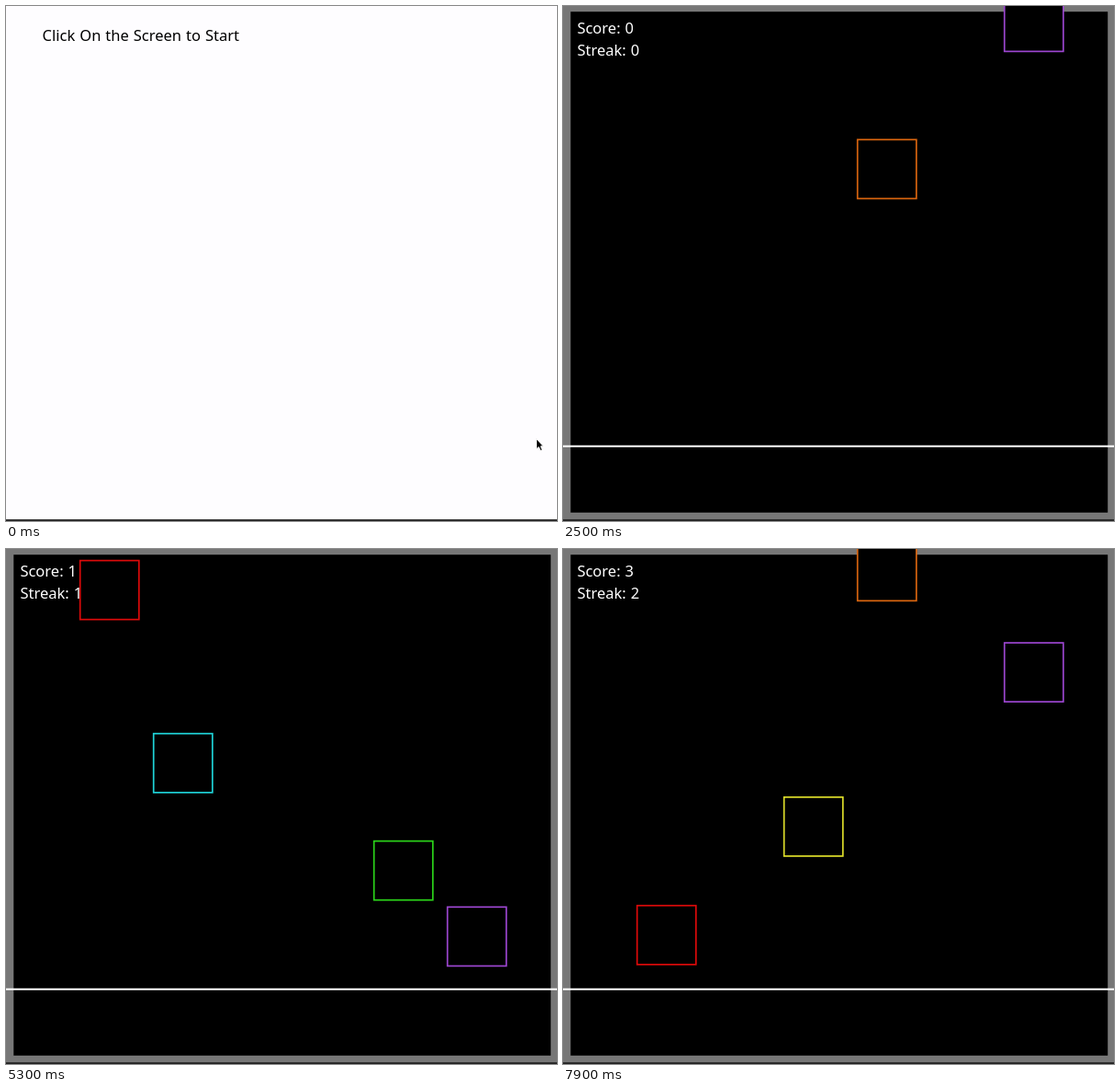
An HTML page that plays this animation: 600 by 560 pixels, repeating every 8 s.

```html
<!DOCTYPE html>
<html lang="en">
<head>
<meta charset="utf-8">
<title>Falling squares</title>
<style>
  html, body { margin: 0; width: 100%; height: 100%; overflow: hidden; background: #fefdff; }
  svg { display: block; width: 600px; height: 560px; }
  text { font: 16.5px "Noto Sans", "Open Sans", sans-serif; word-spacing: .7px; }
</style>
</head>
<body>
<svg viewBox="0 0 600 560">
  <g id="intro">
    <rect width="600" height="560" fill="#fefdff"/>
    <text x="39.6" y="37.8">Click On the Screen to Start</text>
  </g>
  <g id="game">
    <rect width="600" height="560" fill="#777"/>
    <rect x="8.3" y="6.2" width="584.9" height="544.6"/>
    <rect y="477.7" width="600" height="2" fill="#fff"/>
    <g id="squares" stroke-width="1.7"></g>
    <g fill="#fff">
      <text id="score" x="15.4" y="29.8"></text>
      <text id="streak" x="15.4" y="53.8"></text>
    </g>
  </g>
  <rect y="558.2" width="600" height="1.8" fill="#222"/>
  <path id="cursor" d="M0 0V11.2L2.6 8.9L4.4 13L6.4 12.2L4.7 8.2H7.6Z" stroke="#fff" stroke-linejoin="round"/>
</svg>
<script>
const LOOP = 8000, TICK = 100;
const GAME_START = 700, CURSOR_TRAVEL = 400, CURSOR_HIDE = 900;
const SIZE = 64.1, SPEED = 0.1443; // px, px per ms
const HIT_Y = 435, EXIT_Y = 479;   // top edge when a key press counts, and when a square leaves

const laneColors = ["#dd0a0a", "#1fd3d8", "#dede2a", "#d9650f", "#2bd41a", "#9c46d0"];

// start: time at which the top edge reaches y = 0
const squares = [
  { lane: 3, start: 1493 },
  { lane: 5, start: 2602, missed: true },
  { lane: 4, start: 3099 },
  { lane: 1, start: 3909 },
  { lane: 0, start: 5213 },
  { lane: 2, start: 6030 },
  { lane: 5, start: 7193 },
  { lane: 3, start: 7954 }
];

const el = id => document.getElementById(id);
const show = (node, on) => node.setAttribute("visibility", on ? "inherit" : "hidden");
const topAt = (square, t) => (t - square.start) * SPEED;

for (const square of squares) {
  square.node = document.createElementNS("http://www.w3.org/2000/svg", "rect");
  const attrs = { x: 80.7 + square.lane * 80, width: SIZE, height: SIZE, stroke: laneColors[square.lane] };
  for (const name in attrs) square.node.setAttribute(name, attrs[name]);
  el("squares").append(square.node);
}

// Quadratic curve from a to c, pulled towards b
const curve = (a, b, c, p) => (1 - p) ** 2 * a + 2 * p * (1 - p) * b + p * p * c;

function drawCursor(t) {
  const p = Math.min(t / CURSOR_TRAVEL, 1);
  const x = curve(577.6, 552, 514.6, p);
  const y = curve(470.6, 498, 473.5, p);
  el("cursor").setAttribute("transform", `translate(${x} ${y})`);
  show(el("cursor"), t < CURSOR_HIDE);
}

function drawSquares(t) {
  let score = 0, streak = 0;
  for (const square of squares) {
    const top = topAt(square, t);
    square.node.setAttribute("y", top);
    show(square.node, top > -SIZE - 2 && top < EXIT_Y);
    if (top > HIT_Y && !square.missed) score++;
    if (top >= EXIT_Y) streak = square.missed ? 0 : streak + 1;
  }
  el("score").textContent = `Score: ${score}`;
  el("streak").textContent = `Streak: ${streak}`;
}

function render(t) {
  show(el("intro"), t < GAME_START);
  show(el("game"), t >= GAME_START);
  drawSquares(t);
  drawCursor(t);
}

const origin = performance.now();
function frame() {
  const elapsed = (performance.now() - origin) % LOOP;
  render(Math.floor(elapsed / TICK) * TICK);
  requestAnimationFrame(frame);
}
render(0);
requestAnimationFrame(frame);
</script>
</body>
</html>
```
